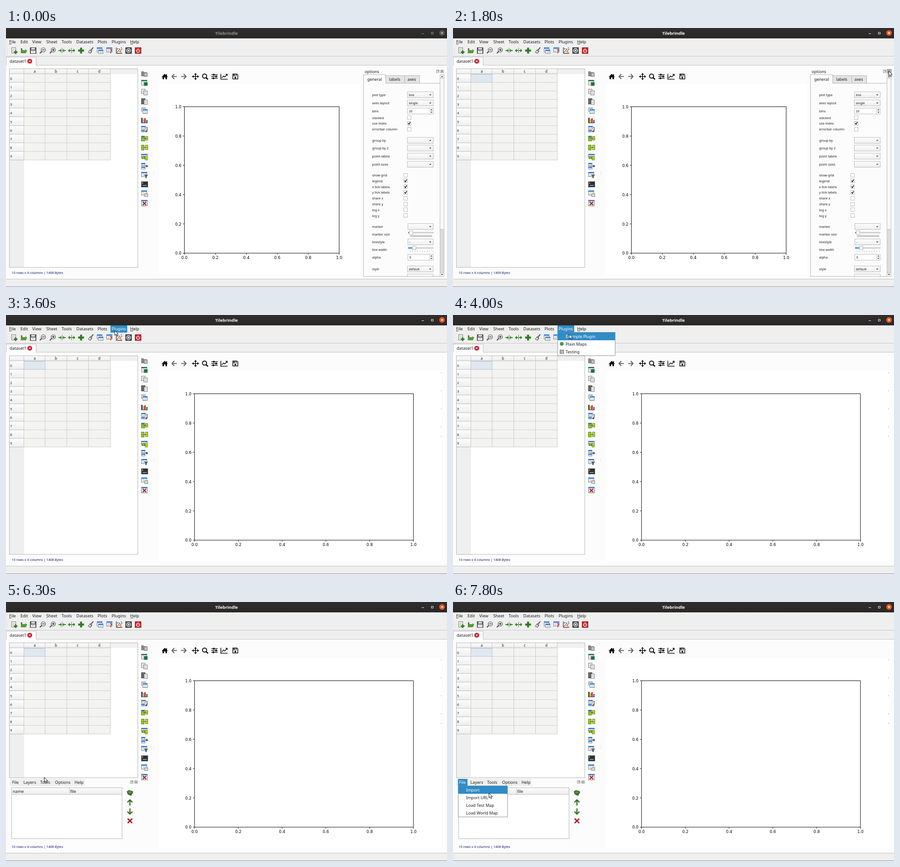
Recreate the animation shown at these times as an HTML page with a canvas. Size 975 by 574 pixels, loop 8000 ms.

```html
<!DOCTYPE html>
<html lang="en">
<head>
<meta charset="utf-8">
<title>Table editor</title>
<style>
html, body { margin: 0; width: 100%; height: 100%; overflow: hidden; background: #efefef; }
canvas { display: block; }
</style>
</head>
<body>
<canvas width="975" height="574"></canvas>
<script>
const c = document.querySelector('canvas').getContext('2d');
const UI = '"Noto Sans", sans-serif', PLOT = '"DejaVu Sans", sans-serif';
const BLUE = '#308cc6', GREY = '#efefef', PAGE = '#fcfcfc', LINE = '#b4b4b4';
const GREEN = '#2f7d20', DARK = '#33393b', HEAD = '#3d7edb';
const LOOP = 8000, STEP = 100;

// ---- helpers ----
function rect(x, y, w, h, fill) {
  c.fillStyle = fill;
  c.fillRect(x, y, w, h);
}
function box(x, y, w, h, fill, border = LINE) {
  rect(x, y, w, h, border);
  rect(x + 1, y + 1, w - 2, h - 2, fill);
}
// Left-aligned text starts with its ink, not its side bearing, at x.
function text(s, x, y, size = 9.1, color = '#1b1b1b', align = 'left', font = UI, weight = '') {
  c.font = `${weight} ${size}px ${font}`;
  c.fillStyle = color;
  c.textAlign = align;
  if (align == 'left') x += c.measureText(s).actualBoundingBoxLeft;
  c.fillText(s, x, y + size * 0.36);
}
function fill(d, color) {
  c.fillStyle = color;
  c.fill(new Path2D(d));
}
function line(d, color = DARK, width = 1) {
  c.strokeStyle = color;
  c.lineWidth = width;
  c.stroke(new Path2D(d));
}
function dot(x, y, r, color) {
  c.beginPath();
  c.arc(x, y, r, 0, 7);
  c.fillStyle = color;
  c.fill();
}
function ring(x, y, r, color, width) {
  c.beginPath();
  c.arc(x, y, r, 0, 7);
  c.strokeStyle = color;
  c.lineWidth = width;
  c.stroke();
}
function shade(x, y, w, h, top, bottom) {
  const g = c.createLinearGradient(0, y, 0, y + h);
  g.addColorStop(0, top);
  g.addColorStop(1, bottom);
  rect(x, y, w, h, g);
}
function at(x, y, draw) {
  c.save();
  c.translate(x, y);
  draw();
  c.restore();
}

// ---- icons, each centred on 0,0 ----
function table(x = -7, y = -6, w = 13, h = 11, head = HEAD, body = '#fff') {
  box(x, y, w, h, body, '#7d8581');
  rect(x, y, w, 3, head);
  for (let i = 1; i < 3; i++) rect(x + Math.round(w * i / 3), y + 3, 1, h - 4, '#c3c8c4');
  for (let j = 5; j < h - 1; j += 3) rect(x + 1, y + j, w - 2, 1, '#c3c8c4');
}
function sheet(x, y, w, h, color = '#f2f2f0') {
  box(x, y, w, h, color, '#7a7d78');
  for (let j = 3; j < h - 2; j += 2) rect(x + 2, y + j, w - 4, 1, '#c6c8c3');
}
function lens(sign) {
  line('M-2 2L-6 6', '#4b4f4c', 2.4);
  dot(1.5, -1.5, 4.6, '#f4f6f4');
  ring(1.5, -1.5, 4.6, '#565a57', 1.4);
  line(sign, '#222', 1.4);
}
function block(x, y, w, h, color) {
  box(x, y, w, h, color, '#4e7f1c');
  rect(x + 1, y + Math.floor(h / 2), w - 2, 1, '#6f9a22');
}
function cross(r, color, width) {
  line(`M${-r} ${-r}L${r} ${r}M${r} ${-r}L${-r} ${r}`, color, width);
}
const toolIcons = [
  () => { sheet(-6, -7, 10, 13); line('M3.5 -.5V7.5M-.5 3.5H7.5', GREEN, 3); },
  () => { fill('M-6 -5H-1L0 -3H5V5H-6Z', '#5d665a'); rect(-3, -5, 7, 4, '#eee'); fill('M-7 6L-4 -1H8L5 6Z', '#579a35'); },
  () => { box(-7, -7, 14, 14, '#5c605d', '#3c3f3d'); rect(-4, -6, 8, 4, '#dcdcda'); rect(-5, 0, 10, 6, '#f3f3f1'); rect(-3, 2, 6, 1, '#999'); },
  () => lens('M-1 -1.5H4'),
  () => lens('M-1 -1.5H4M1.5 -4V1'),
  () => { rect(-.5, -6, 1, 12, '#666'); fill('M-1 0L-4 -4V-1H-8V1H-4V4ZM1 0L4 -4V-1H8V1H4V4Z', GREEN); },
  () => { rect(-.5, -6, 1, 12, '#666'); fill('M-8 0L-4 -4V-1H-1V1H-4V4ZM8 0L4 -4V-1H1V1H4V4Z', GREEN); },
  () => line('M0 -6.5V6.5M-6.5 0H6.5', GREEN, 4.4),
  () => { line('M6 -7L1 -1', '#50534f', 2); fill('M-1 -3L4 1L0 7L-6 4Z', '#70746f'); fill('M-1 0L1 2L-1 5L-4 3Z', '#f2f2f0'); },
  () => { table(-7, -7, 12, 11); table(-4, -2, 11, 9); },
  () => { table(-7, -7, 13, 11); text('?', 3, 2, 12, '#c4161c', 'center', UI, 'bold'); },
  () => {
    rect(-7, -7, 14, 14, '#fafafa');
    line('M-6 -7V6H7', '#333', 1.3);
    line('M-5 4L-1 0L2 2L7 -4', '#d03232', 1.3);
    dot(-3, -4, 1.5, '#3a78c3'); dot(1, -3, 1.5, GREEN); dot(4, 3, 1.6, '#e39a22'); dot(5, -6, 1.2, '#3a78c3');
  },
  () => { box(-7, -7, 14, 14, '#4c4f4e', '#2b2d2c'); ring(0, 0, 4.3, '#f4f4f4', 1.5); dot(0, 0, 2, '#e8e8e8'); },
  () => { box(-7, -7, 14, 14, '#c9252b', '#8e1418'); c.beginPath(); c.arc(0, .5, 3.6, -.9, 4.05); c.strokeStyle = '#fff'; c.lineWidth = 1.4; c.stroke(); line('M0 -5V0', '#fff', 1.4); },
];
const sideIcons = [
  () => { fill('M-7 -6H-2L-1 -4H5V5H-7Z', '#858981'); sheet(-1, -3, 8, 9, '#b9bcb5'); },
  () => { table(-7, -7, 13, 12, '#2c7d4a'); rect(-1, -2, 8, 8, '#217346'); },
  () => { sheet(-7, -7, 9, 11); sheet(-2, -3, 9, 10); },
  () => { box(-7, -7, 9, 13, '#6a6863', '#4a4845'); sheet(-1, -4, 8, 11); },
  () => { table(-7, -7, 10, 9, '#9db6d6'); table(-4, -3, 11, 10); },
  () => { [[-7, 11, '#3c4043'], [-3, 8, '#d89a2b'], [0, 10, '#c53a27'], [4, 6, '#3a66a5']].forEach(([x, h, k]) => rect(x, 6 - h, 3, h, k)); rect(-7, 6, 14, 1, '#444'); },
  () => { table(-7, -7, 10, 8); table(-7, 2, 8, 5); line('M4 -4H6V5H3M4.5 3L2.5 5L4.5 7', '#222', 1.2); },
  () => { block(-7, -6, 8, 12, '#9ccb1c'); rect(-6, -5, 6, 3, HEAD); block(2, -5, 6, 9, '#d5dc2b'); line('M-1 0H4', '#333'); },
  () => { block(-7, -6, 7, 12, '#9ccb1c'); block(2, -6, 6, 11, '#d5dc2b'); line('M-1 0H4', '#333'); },
  () => { table(-7, -7, 14, 8); block(-6, -2, 7, 6, '#9ccb1c'); block(1, -2, 6, 9, '#d5dc2b'); },
  () => { table(-7, -7, 9, 7); table(-7, 1, 9, 6); line('M2 0H7M4.5 -2.5L7 0L4.5 2.5', '#222', 1.3); },
  () => { table(-7, -7, 13, 11); fill('M-1 -1H8L5 3V7L2 6V3Z', '#5d625f'); },
  () => { box(-7, -7, 15, 13, '#2b3033', '#50565a'); line('M-5 -5L-3 -3.5L-5 -2', '#fff'); rect(-4, 1, 9, 2, '#8d989b'); },
  () => { table(-7, -7, 13, 11); sheet(0, 0, 8, 7, '#dfe3e6'); },
  () => { table(-7, -7, 14, 14); at(0, 1, () => cross(3.8, '#b5161a', 2.2)); },
];
const plotIcons = [
  [351, () => fill('M-7 1L0 -6L3 -3V-5H5V-1L7 1H5V6H1.5V2H-1.5V6H-5V1Z', '#111')],
  [372, () => line('M6 0H-5M0 -5.5L-5 0L0 5.5', '#666', 2.2)],
  [393, () => line('M-6 0H5M0 -5.5L5 0L0 5.5', '#666', 2.2)],
  [419, () => { line('M0 -6V6M-6 0H6', '#111', 1.7); fill('M0 -8L3 -4H-3ZM0 8L3 4H-3ZM-8 0L-4 -3V3ZM8 0L4 -3V3Z', '#111'); }],
  [440, () => { ring(-1, -1, 4.6, '#111', 2); line('M2.5 2.5L6.5 6.5', '#111', 2.6); }],
  [461, () => { line('M-7 -4H7M-7 0H7M-7 4H7', '#111', 1.3); rect(-3, -6, 3, 4, '#111'); rect(2, -2, 3, 4, '#111'); rect(-4, 2, 3, 4, '#111'); }],
  [482, () => { line('M-7 -6V6H8', '#111', 1.6); line('M-5 3L-1 -1L2 1L7 -5M3.5 -5H7V-1.5', '#111', 1.6); }],
  [507, () => { line('M-5.5 -5.5H3.5L5.5 -3.5V5.5H-5.5Z', '#111', 1.6); rect(-4, -5, 7, 4, '#111'); rect(-2, -4, 4, 2, '#fff'); dot(0, 2.5, 2, '#111'); }],
];
const iconX = i => 18.3 + 21.05 * i;

// ---- window parts ----
function titleBar(active) {
  shade(0, 0, 975, 23, '#312f2e', '#2a2827');
  const ink = active ? '#fff' : '#96938f';
  text('Tilebrindle', 487.5, 11.5, 9.4, ink, 'center', UI, 'bold');
  rect(919, 12, 5, 1, ink);
  line('M940.5 9.5H944.5V13.5H940.5Z', ink);
  dot(964, 11, 6.2, active ? '#e95420' : '#55524f');
  at(964, 11, () => cross(2, active ? '#fff' : '#c8c5c2', 1.1));
}
const menus = [['File', 7], ['Edit', 32], ['View', 58], ['Sheet', 89], ['Tools', 123],
  ['Datasets', 155.5], ['Plots', 202.5], ['Plugins', 233.5], ['Help', 274.5]];
function toolbar(open, tip) {
  rect(0, 23, 975, 60, GREY);
  if (open) rect(231, 23, 37, 16, BLUE);
  for (const [s, x] of menus) text(s, x, 30.5, 9.2, open && s == 'Plugins' ? '#fff' : '#1b1b1b');
  rect(7, 35, 5, 1, '#333');
  rect(275, 35, 6, 1, '#333');
  for (let y = 44; y < 58; y += 3) rect(3, y, 1, 1, '#c4c4c4');
  toolIcons.forEach((icon, i) => {
    const x = iconX(i);
    if (tip && Math.abs(tip[0] - x) < 10 && Math.abs(tip[1] - 50) < 10)
      box(Math.round(x) - 10, 41, 20, 20, '#f7f7f7');
    at(Math.round(x), 50, icon);
  });
  rect(0, 62, 975, 1, '#c6c6c6');
}
function page() {
  rect(0, 82, 975, 475, PAGE);
  rect(0, 82, 975, 1, '#c0c0c0');
  box(0, 64, 67, 19, PAGE, '#bcbcbc');
  rect(1, 82, 65, 1, PAGE);
  text('dataset1', 8, 74);
  dot(52.5, 73.5, 5.3, '#d0142c');
  at(52.5, 73.5, () => cross(1.9, '#fff', 1.2));
  rect(0, 556, 975, 1, '#bebebe');
  rect(0, 557, 975, 16, GREY);
  rect(0, 573, 975, 1, '#8c8c8c');
  text('10 rows x 4 columns | 1408 Bytes', 12.5, 542, 7.25, '#14146e');
  rect(326, 317, 1, 9, '#e8e8e8');
  sideIcons.forEach((icon, i) => at(306, Math.round(101.5 + 20.45 * i), icon));
}
function grid(bottom, selected) {
  box(7, 90, 285, bottom - 90, '#fff');
  rect(8, 91, 283, 11, '#f0f0f0');
  rect(8, 102, 32, bottom - 103, GREY);
  rect(40, 102, 191, 191, '#f3f3f2');
  for (let i = 0; i < 10; i++) {
    const y = Math.round(102 + 19.1 * i);
    shade(8, y, 31, 18, '#fcfcfc', '#efefef');
    rect(8, y + 18, 32, 1, '#bdbdbd');
    rect(40, y + 18, 191, 1, '#cfcfcc');
    text(i, 9, y + 10.3, 7.6);
  }
  shade(8, 91, 223, 10, '#fbfbfb', '#ededed');
  rect(8, 101, 223, 1, '#bdbdbd');
  for (let i = 0; i < 5; i++) {
    const x = 39 + 48 * i - (i > 0);
    rect(x, 91, 1, 202, '#c8c8c6');
    if (i < 4) text('abcd'[i], x + 24.5, 96, 8, '#1b1b1b', 'center');
  }
  if (selected) box(39, 102, 48, 19, '#dfe8f0', '#b4c4d1');
}
function plot(x0, x1, right) {
  plotIcons.forEach(([x, icon]) => at(x, 107.5, icon));
  for (const x of [406, 497]) for (let y = 101; y < 115; y += 3) rect(x, y, 1, 1, '#d8d8d8');
  rect(338, 124, right - 338, 422, '#fff');
  c.strokeStyle = '#000';
  c.lineWidth = 1;
  c.strokeRect(x0, 174.5, x1 - x0, 324.5);
  for (let i = 0; i < 6; i++) {
    const x = x0 + (x1 - x0) * i / 5, y = 499 - 324.5 * i / 5, s = (i / 5).toFixed(1);
    line(`M${x} 499V502.5M${x0} ${y}h-3.5`, '#000', .9);
    text(s, x, 509, 8.7, '#000', 'center', PLOT);
    text(s, x0 - 6.7, y + .3, 8.7, '#000', 'right', PLOT);
  }
}
function dockButtons(x, y, hover) {
  if (hover) box(x + 5, y - 5, 10, 10, '#d4d4d4', '#888');
  for (const dx of [0, 9.5]) {
    line(`M${x + dx - 3} ${y - 3}h6v6h-6z`, '#858585', .9);
    at(x + dx, y, () => dx ? cross(2, '#4a4a4a', 1) : line('M-1.5 1.5L1.5 -1.5M-1 -1.5H1.5V1', '#666', .8));
  }
}

// ---- options panel ----
function arrow(x, y, up = 1) {
  fill(`M${x - 2.5} ${y - up}h5l-2.5 ${3 * up}z`, '#555');
}
function field(label, y, value, x = 887, spin) {
  text(label, 809.5, y, 7.2);
  box(x, y - 7, 945 - x, 14, '#fff', '#b9b9b9');
  if (!spin) shade(x + 1, y - 6, 943 - x, 12, '#fdfdfd', '#efefef');
  text(value, x + 3.5, y, 7.2);
  if (spin) {
    rect(936, y - 6, 1, 12, '#c8c8c8');
    arrow(940.5, y - 2.5, -1);
    arrow(940.5, y + 2.5);
  } else arrow(938, y);
}
function check(label, y, on, x) {
  text(label, 809.5, y, 7.2);
  box(x - 4, Math.round(y) - 5, 9, 9, '#fff', '#b9b9b9');
  if (on) line(`M${x - 2} ${y - 1}l2 2.7l3 -5`, '#111', 1.5);
}
function slider(label, y, knob, gap) {
  text(label, 809.5, y + 3.3, 7.2);
  box(889, y - 2, 56, 3, '#e2e2e2', '#c4c4c4');
  rect(889, y - 2, knob - 889, 3, '#3f92cb');
  for (let x = 893; x < 942; x += gap) rect(x, y + 6, 1, 2, '#a4a4a4');
  box(knob - 4, y - 5, 9, 9, '#fafafa', '#b4b4b4');
}
function options(hover) {
  text('options', 793, 96.3);
  dockButtons(954.5, 96, hover);
  box(790, 122, 170, 429, PAGE);
  box(839, 105, 43, 18, '#e4e4e4');
  box(881, 105, 34, 18, '#e4e4e4');
  box(790, 103, 50, 20, PAGE);
  rect(791, 122, 48, 1, PAGE);
  text('general', 815, 113.5, 9.1, '#1b1b1b', 'center');
  text('labels', 859.5, 114, 9.1, '#1b1b1b', 'center');
  text('axes', 897, 114, 9.1, '#1b1b1b', 'center');
  box(959, 103, 10, 448, '#dcdcdc', '#bdbdbd');
  box(959, 111, 10, 336, '#f7f7f7', '#bdbdbd');
  box(959, 103, 10, 9, '#f4f4f4', '#bdbdbd');
  box(959, 542, 10, 9, '#f4f4f4', '#bdbdbd');
  arrow(964, 108, -1);
  arrow(964, 546);

  field('plot type', 148, 'line');
  field('axes layout', 166, 'single');
  field('bins', 184, '20', 887, true);
  ['stacked', 'use index', 'errorbar column'].forEach((s, i) => check(s, 199 + 12.8 * i, i == 1, 891));
  ['group by', 'group by 2', 'point labels', 'point sizes'].forEach((s, i) => field(s, Math.round(248.6 + 17.8 * i), ''));
  ['show grid', 'legend', 'x tick labels', 'y tick labels', 'share x', 'share y', 'log x', 'log y']
    .forEach((s, i) => check(s, 326.5 + 12.8 * i, i > 0 && i < 4, 883));
  field('marker', 440, '', 888);
  slider('marker size', 454, 895, 1);
  field('linestyle', 474, '-', 888);
  slider('line width', 488, 902, 5.4);
  field('alpha', 508, '9', 888, true);
  field('style', 534, 'default');
  c.save();
  c.beginPath();
  c.rect(791, 544, 168, 6);
  c.clip();
  field('colormap', 552, 'Spectral');
  c.restore();
}

// ---- layer panel and popups ----
function layers(open) {
  rect(8, 392, 166, 16, GREY);
  if (open) rect(11, 392, 21, 16, BLUE);
  [['File', 13.5], ['Layers', 38.5], ['Tools', 75.5], ['Options', 108.5], ['Help', 151.5]]
    .forEach(([s, x], i) => text(s, x, 400, 9.2, open && !i ? '#fff' : '#1b1b1b'));
  dockButtons(278, 399, false);
  box(12, 411, 245, 114, '#fff');
  shade(13, 412, 243, 14, '#fbfbfb', '#ededed');
  rect(13, 426, 243, 1, '#c0c0c0');
  rect(140, 412, 1, 14, '#c0c0c0');
  text('name', 15, 419.5);
  text('file', 142, 419.5);
  at(274, 423, () => {
    fill('M-7 -3L-3 -6L2 -5L6 -4L7 0L4 3L3 7L-1 5L-5 3Z', '#3a6b2c');
    fill('M-4 -3L0 -4L4 -2L2 1L-3 1Z', '#5d9443');
  });
  for (const [y, s] of [[444, 1], [464.5, -1]])
    at(274, y, () => { c.scale(1, s); line('M0 7V-5M-5.5 0L0 -5.5L5.5 0', '#38702a', 2.6); });
  at(274, 485, () => cross(5, '#b5121b', 2.8));
}
function popup(x, y, w, items, textX, tip) {
  box(x, y, w, items.length * 17.2 + 1, '#fff', '#8f8f8f');
  items.forEach((s, i) => {
    const top = y + 1 + 17.1 * i;
    const on = tip[1] >= top && tip[1] < top + 17.1;
    if (on) rect(x + .5, top - .5, w - 1, 17.5, BLUE);
    text(s, textX, top + 8.4, 9.1, on ? '#fff' : '#1b1b1b');
  });
}

// ---- pointer: [time, x, y], straight runs between the points ----
const path = [[100, 107, 1], [400, 330, 137], [700, 780, 118], [900, 957, 97], [1000, 952, 96],
  [1400, 963, 95], [1900, 963, 95], [2300, 953, 191], [2699, 953, 191], [2700, 277, 53],
  [3400, 240, 34], [3900, 240, 34], [4300, 306, 66], [4400, 306, 66], [4600, 340, 66],
  [4700, 340, 66], [4800, 340, 65.5], [5700, 340, 65.5], [6300, 84, 388], [6600, 30, 402],
  [6700, 25, 402], [7200, 25, 402], [7800, 79, 423], [LOOP, 79, 423]];
function pointer(t) {
  const i = path.findIndex(p => p[0] > t);
  if (i < 1) return null;
  const [a, b] = [path[i - 1], path[i]], k = (t - a[0]) / (b[0] - a[0]);
  return [a[1] + (b[1] - a[1]) * k, a[2] + (b[2] - a[2]) * k];
}

function draw(t) {
  const tip = pointer(t);
  const active = t >= 1700, docked = t < 1900, wide = t >= 2000, panel = t >= 5500;
  const plugins = t >= 3600 && t < 5500, file = t >= 6900;
  titleBar(active);
  toolbar(plugins, tip);
  page();
  grid(panel ? 390 : 531, active);
  if (wide) plot(416.8, 900.8, 964);
  else plot(394.4, 736.6, 782);
  if (docked) options(t >= 1000);
  else for (const y of [127, 167, 207, 247, 268]) rect(962, y, 1, 1.5, '#777');
  if (panel) layers(file);
  if (plugins && t >= 3700) {
    popup(231, 38, 128, ['Example Plugin', 'Plain Maps', 'Testing'], 249, tip);
    dot(240.5, 64, 4.3, '#4b9a4a');
    box(236, 77, 9, 9, '#ddd', '#6b6264');
    rect(238, 79, 2, 2, '#b5474f');
    rect(238, 82, 2, 2, '#b5474f');
    rect(241, 79, 3, 1, '#666');
    rect(241, 82, 3, 1, '#666');
  }
  if (t >= 7000) popup(11, 407, 110, ['Import', 'Import URL', 'Load Test Map', 'Load World Map'], 29, tip);
  if (tip) at(tip[0], tip[1], () => {
    const d = 'M.5 .5V11L3 8.8L4.8 12.8L6.6 12L4.9 8.2H8.2Z';
    fill(d, '#fff');
    line(d, '#111', 1);
  });
}

function frame(now) {
  draw(Math.floor(now % LOOP / STEP) * STEP);
  requestAnimationFrame(frame);
}
requestAnimationFrame(frame);
</script>
</body>
</html>
```
